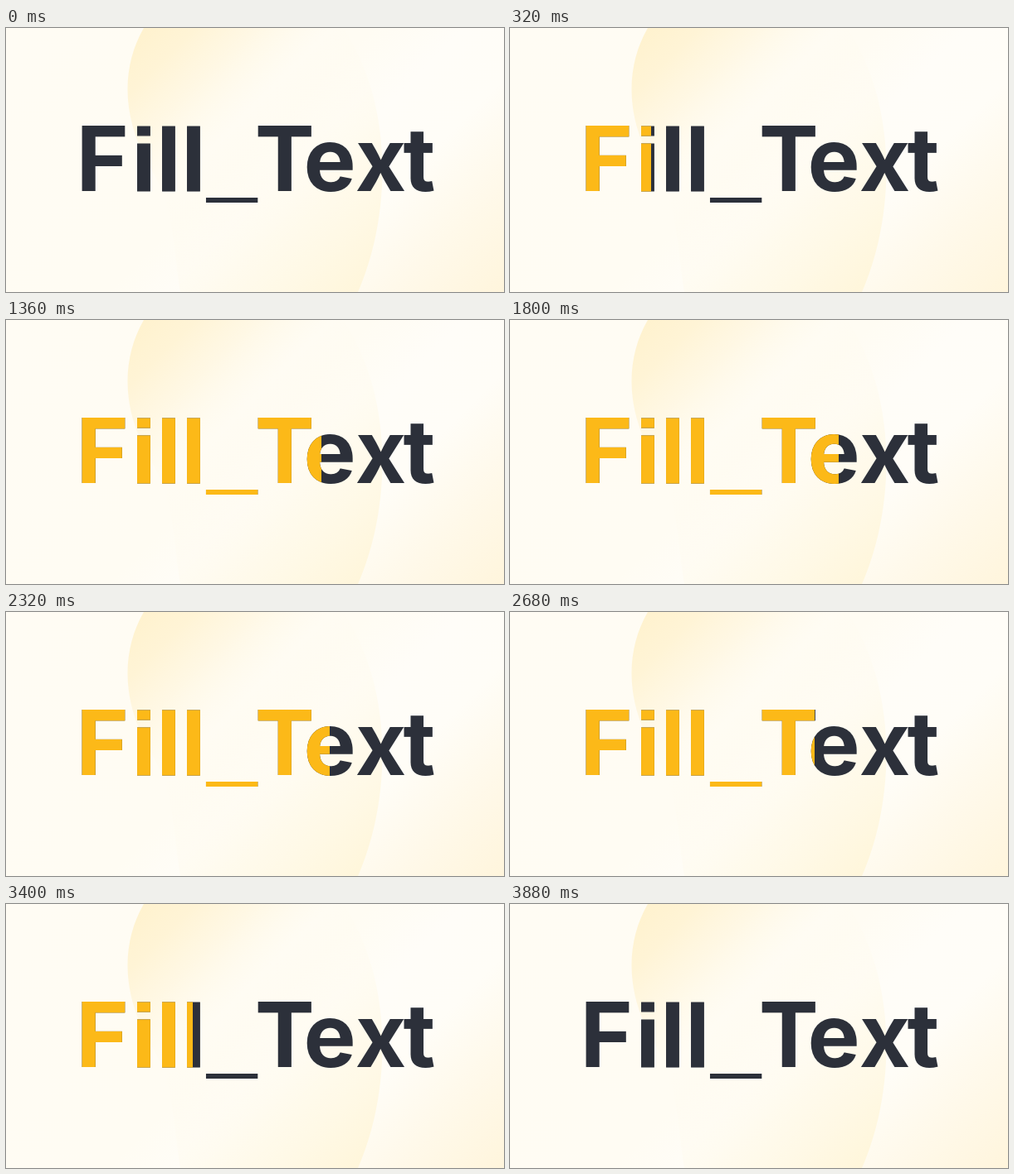
Recreate the animation shown at these times as an HTML page. Size 600 by 319 pixels, loop 3.96 s.

```html
<!DOCTYPE html>
<html lang="en">
<head>
<meta charset="utf-8">
<title>Fill_Text</title>
<style>
  html, body { margin: 0; width: 100%; height: 100%; overflow: hidden; }
  svg { display: block; width: 600px; height: 319px; }
  text { font: bold 108px Inter, sans-serif; font-kerning: none; fill: currentColor; }
  .centred { text-anchor: middle; }
  .small { font-size: 106px; }
  .stem, .line { font-family: "Liberation Sans", Arial, sans-serif; stroke: currentColor; }
  .line { font-size: 105px; stroke-width: 2px; }
</style>
</head>
<body>
<svg viewBox="0 0 600 319">
  <defs>
    <linearGradient id="backdrop" gradientUnits="userSpaceOnUse" x1="0" y1="0" x2="460" y2="460">
      <stop offset="0" stop-color="#fffcf4"/>
      <stop offset=".48" stop-color="#fffcf3"/>
      <stop offset=".6" stop-color="#fffdf8"/>
      <stop offset=".72" stop-color="#fffdf7"/>
      <stop offset=".85" stop-color="#fff9ea"/>
      <stop offset="1" stop-color="#fff5dc"/>
    </linearGradient>
    <linearGradient id="blob" gradientUnits="userSpaceOnUse" x1="80" y1="80" x2="370" y2="370">
      <stop offset="0" stop-color="#fff2ce"/>
      <stop offset=".12" stop-color="#fff4d6"/>
      <stop offset=".24" stop-color="#fff5da" stop-opacity=".6"/>
      <stop offset=".4" stop-color="#fff9e6" stop-opacity="0"/>
      <stop offset=".6" stop-color="#fff9e6" stop-opacity=".2"/>
      <stop offset=".75" stop-color="#fff9e6" stop-opacity=".7"/>
      <stop offset="1" stop-color="#fff6db"/>
    </linearGradient>
    <clipPath id="filled"><rect id="fill" height="319"/></clipPath>
    <text id="word" y="197"><tspan x="84.5">F</tspan><tspan class="stem" x="151 181 211">ill</tspan><tspan class="line" x="243">_</tspan><tspan class="centred" x="335.7">T</tspan><tspan class="centred small" x="390 451.6 498">ext</tspan></text>
  </defs>
  <rect width="600" height="319" fill="url(#backdrop)"/>
  <path d="M166 0C140 45 138 105 172 165S200 260 210 319H424C465 225 467 90 406 0Z" fill="url(#blob)"/>
  <use href="#word" color="#2c303a"/>
  <use href="#word" color="#fcb918" clip-path="url(#filled)"/>
</svg>
<script>
  const LOOP = 3960, HALF = 2000, LEAD = 60;
  const ORIGIN = 84, REACH = 313;
  const fill = document.getElementById("fill");

  // cubic-bezier(.25, .1, .25, 1), solved by bisection
  function ease(p) {
    let low = 0, high = 1;
    for (let i = 0; i < 24; i++) {
      const s = (low + high) / 2;
      if (0.75 * s * (1 - s) + s ** 3 < p) low = s;
      else high = s;
    }
    const s = low, r = 1 - s;
    return 0.3 * s * r * r + 3 * s * s * r + s ** 3;
  }

  function draw() {
    const t = performance.now() % LOOP;
    const progress = Math.max(0, Math.min(t + LEAD, 2 * HALF - LEAD - t)) / HALF;
    fill.setAttribute("width", Math.round(ORIGIN + REACH * ease(progress)));
    requestAnimationFrame(draw);
  }
  draw();
</script>
</body>
</html>
```
